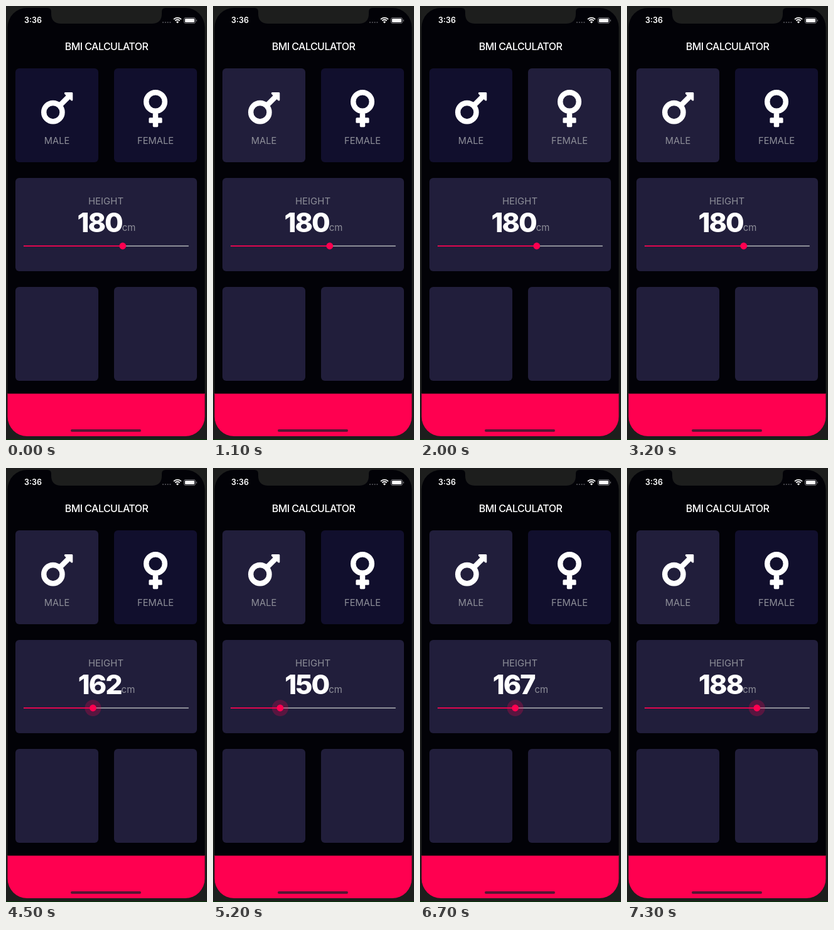
Animation, 320 px wide and 689 px high, one loop 7.5 s. Source, as an HTML page with a canvas:

```html
<!DOCTYPE html>
<html lang="en">
<head>
<meta charset="utf-8">
<title>BMI Calculator</title>
<style>
  html, body { margin: 0; width: 100%; height: 100%; overflow: hidden; background: #1d1e1d; }
  canvas { display: block; width: 320px; height: 689px; }
</style>
</head>
<body>
<canvas id="stage" width="320" height="689"></canvas>
<script>
const ctx = document.getElementById('stage').getContext('2d');
const LOOP = 7500, STEP = 100;
const PINK = '#ff0050', GREY = '#8d8e98', WHITE = '#fff';
const ACTIVE = '#211e3b', INACTIVE = '#110f2d';
const SLIDER = { left: 28, right: 291, y: 381, min: 120, max: 220 };

const DRAG_START = 3700;
const heights = [[3700, 180], [4500, 162], [4900, 154], [5500, 146], [6200, 149], [7300, 188]];

function heightAt(t) {
  if (t <= heights[0][0]) return heights[0][1];
  for (let i = 1; i < heights.length; i++) {
    const [t0, v0] = heights[i - 1], [t1, v1] = heights[i];
    if (t <= t1) return Math.round(v0 + (v1 - v0) * (t - t0) / (t1 - t0));
  }
  return heights[heights.length - 1][1];
}

function selectedAt(t) {
  if (t < 900) return '';
  return t >= 1500 && t < 2300 ? 'female' : 'male';
}

function box(x, y, w, h, radius, color) {
  ctx.fillStyle = color;
  ctx.beginPath();
  ctx.roundRect(x, y, w, h, radius);
  ctx.fill();
}

function disc(x, y, r, color) {
  ctx.fillStyle = color;
  ctx.beginPath();
  ctx.arc(x, y, r, 0, Math.PI * 2);
  ctx.fill();
}

function text(str, x, y, size, weight, color, align = 'center', spacing = 0) {
  ctx.font = `${weight} ${size}px Inter, sans-serif`;
  ctx.letterSpacing = spacing + 'px';
  ctx.textAlign = align;
  ctx.fillStyle = color;
  ctx.fillText(str, x, y);
  return ctx.measureText(str).width;
}

function icon(x, y, scale, path) {
  ctx.save();
  ctx.translate(x, y);
  ctx.scale(scale, scale);
  ctx.fillStyle = ctx.strokeStyle = WHITE;
  path();
  ctx.restore();
}

function ring(x, y) {
  ctx.lineWidth = 64;
  ctx.beginPath();
  ctx.arc(x, y, 112, 0, Math.PI * 2);
  ctx.stroke();
}

function male() {
  ring(144, 242);
  ctx.beginPath();
  ctx.moveTo(228, 158);
  ctx.lineTo(335, 51);
  ctx.stroke();
  ctx.fill(new Path2D('M372 0H293c-10.700 0-16 12.900-8.500 20.400L363.600 99.500c7.500 7.500 20.400 2.200 20.400-8.500V12c0-6.600-5.400-12-12-12z'));
}

function female() {
  ring(144, 144);
  box(112, 280, 64, 168, 12, WHITE);
  box(64, 336, 160, 64, 12, WHITE);
}

function statusBar() {
  text('3:36', 29, 27, 12.5, 600, WHITE, 'left');
  for (let i = 0; i < 4; i++) disc(250 + i * 3.8, 26, 1.1, '#55555a');

  ctx.strokeStyle = WHITE;
  ctx.lineWidth = 1.9;
  for (const r of [8.4, 5.2]) {
    ctx.beginPath();
    ctx.arc(273, 27, r, -Math.PI * 0.75, -Math.PI * 0.25);
    ctx.stroke();
  }
  ctx.fillStyle = WHITE;
  ctx.beginPath();
  ctx.moveTo(273, 27.4);
  ctx.arc(273, 27.4, 3, -Math.PI * 0.75, -Math.PI * 0.25);
  ctx.fill();

  ctx.strokeStyle = '#77777c';
  ctx.lineWidth = 1;
  ctx.beginPath();
  ctx.roundRect(283.5, 18.5, 18, 9, 2.5);
  ctx.stroke();
  box(285, 20, 15, 6, 1.3, WHITE);
  box(302.7, 21.5, 1.2, 3, 0.6, '#77777c');
}

function heightCard(t) {
  const value = heightAt(t);
  box(15, 273, 289, 148, 6, ACTIVE);
  text('HEIGHT', 159, 315, 15, 400, GREY);

  ctx.font = '800 43px Inter, sans-serif';
  ctx.letterSpacing = '-2px';
  const numberWidth = ctx.measureText(value).width;
  ctx.font = '400 15px Inter, sans-serif';
  ctx.letterSpacing = '0px';
  const left = 160 - (numberWidth + ctx.measureText('cm').width) / 2;
  text(value, left, 358.5, 43, 800, WHITE, 'left', -2);
  text('cm', left + numberWidth, 357, 15, 400, GREY, 'left');

  const { left: start, right, y, min, max } = SLIDER;
  const x = start + (right - start) * (value - min) / (max - min);
  box(start, y - 1, right - start, 2, 1, GREY);
  box(start, y - 1, x - start, 2, 1, '#e0064e');
  if (t >= DRAG_START) disc(x, y, 13, 'rgba(255, 0, 80, 0.25)');
  disc(x, y, 5.4, PINK);
}

function draw(t) {
  const selected = selectedAt(t);
  ctx.fillStyle = '#1d1e1d';
  ctx.fillRect(0, 0, 320, 689);
  ctx.fillStyle = '#063c08';
  ctx.fillRect(0, 688, 320, 1);

  ctx.save();
  ctx.beginPath();
  ctx.roundRect(2.5, 3, 314, 680, 31);
  ctx.clip();
  ctx.fillStyle = '#020207';
  ctx.fillRect(0, 0, 320, 689);
  ctx.fillStyle = PINK;
  ctx.fillRect(0, 615, 320, 70);
  ctx.fillStyle = '#8b0630';
  ctx.fillRect(0, 615, 320, 1);
  ctx.restore();

  ctx.fillStyle = '#1d1e1d';
  ctx.fill(new Path2D('M66 0V3Q72 3 72 9V12Q72 28 88 28H232Q248 28 248 12V9Q248 3 254 3V0Z'));
  statusBar();
  text('BMI CALCULATOR', 160, 69.5, 16, 500, WHITE, 'center', -0.55);

  box(15, 99, 132, 149, 6, selected === 'male' ? ACTIVE : INACTIVE);
  box(172, 99, 132, 149, 6, selected === 'female' ? ACTIVE : INACTIVE);
  icon(56, 137, 0.131, male);
  icon(219, 133, 0.132, female);
  text('MALE', 81, 219, 14.7, 400, GREY);
  text('FEMALE', 238, 219, 14.7, 400, GREY);

  heightCard(t);
  box(15, 446, 132, 149, 6, ACTIVE);
  box(172, 446, 132, 149, 6, ACTIVE);
  box(103, 672, 112, 4, 2, '#571633');
}

const startTime = performance.now();
function tick() {
  const t = (performance.now() - startTime) % LOOP;
  draw(Math.floor(t / STEP) * STEP);
  requestAnimationFrame(tick);
}
tick();
</script>
</body>
</html>
```
